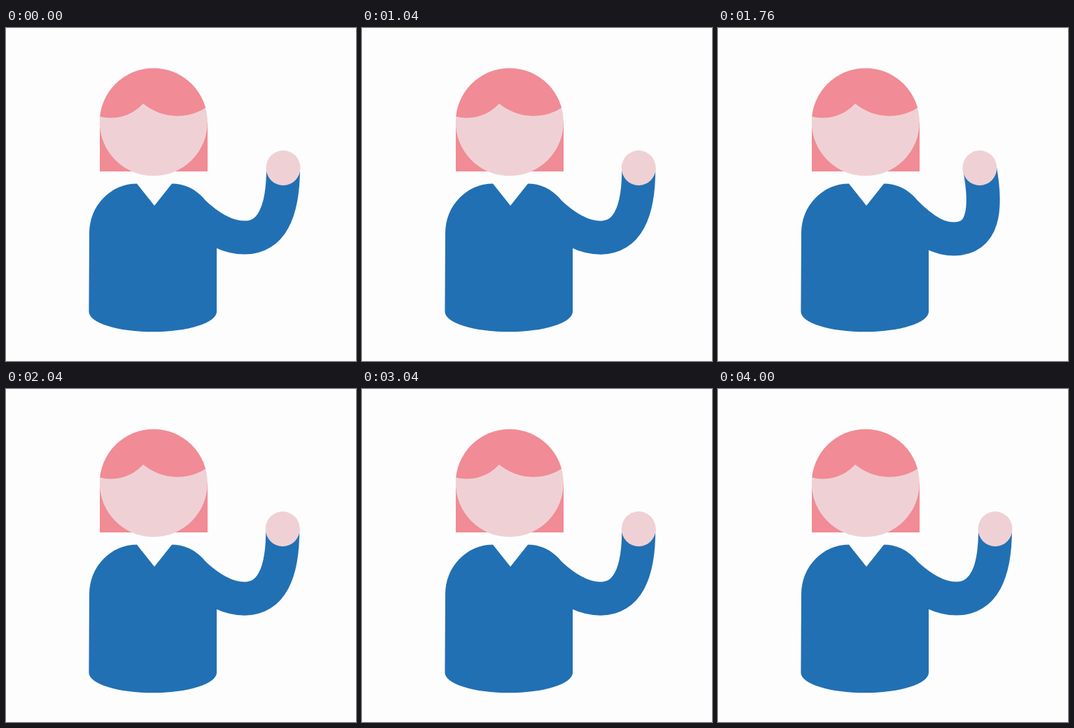
An HTML page for the animation above (4.04 s loop, 500x476 px).

```html
<!DOCTYPE html>
<html lang="en">
<head>
<meta charset="utf-8">
<title>Waving person</title>
<style>
  html, body { margin: 0; width: 100%; height: 100%; overflow: hidden; background: #fdfdfd; }
  svg { display: block; width: 500px; height: 476px; }
  .skin { fill: #efd1d5; }
  .hair { fill: #f18b95; }
  .shirt { fill: #2170b3; }
  .arm { fill: none; stroke: #2170b3; stroke-width: 48px; }
</style>
</head>
<body>
<svg viewBox="0 0 500 476">
  <clipPath id="head"><circle cx="210.8" cy="134.5" r="77"/></clipPath>

  <rect class="hair" x="134" y="134" width="154" height="71"/>
  <circle class="skin" cx="210.8" cy="134.5" r="77"/>
  <path class="hair" clip-path="url(#head)"
    d="M130 50V125.2A62 62 0 0 0 196 108A76.2 76.2 0 0 0 292 109.3V50Z"/>

  <path class="shirt"
    d="M187 222.5L212 254L237 222.5A64 70.5 0 0 1 301 293V405.5A91.3 28.8 0 0 1 118.4 405.5L119 293A68 70.5 0 0 1 187 222.5Z"/>
  <path class="arm" id="arm"/>
  <ellipse class="skin" id="hand" cy="200" rx="24.5" ry="25"/>
</svg>
<script>
  const LOOP = 4040, WAVE = 1000, WAVES = 4;
  const arm = document.getElementById('arm');
  const hand = document.getElementById('hand');

  // swing: 0 = arm held out, 1 = arm bent in
  function pose(swing) {
    const mix = (out, bent) => out + (bent - out) * swing;
    const elbowX = mix(341, 333), elbowY = mix(299.6, 303.6);
    const handX = mix(396, 348.4), handY = 200;
    const reach = mix(37, 45.5);                  // curve handle at the elbow
    const wristX = handX + mix(0, 24.5), wristY = handY + mix(65, 57);

    arm.setAttribute('d',
      `M268.5 264C297 ${elbowY - 9} ${elbowX - 20} ${elbowY} ${elbowX} ${elbowY}` +
      `C${elbowX + reach} ${elbowY} ${wristX} ${wristY} ${handX} ${handY}`);
    hand.setAttribute('cx', handX);
  }

  // whole waves, then a short rest until the loop ends
  function draw() {
    const time = Math.min(performance.now() % LOOP, WAVES * WAVE);
    pose((1 - Math.cos(2 * Math.PI * time / WAVE)) / 2);
    requestAnimationFrame(draw);
  }
  draw();
</script>
</body>
</html>
```
